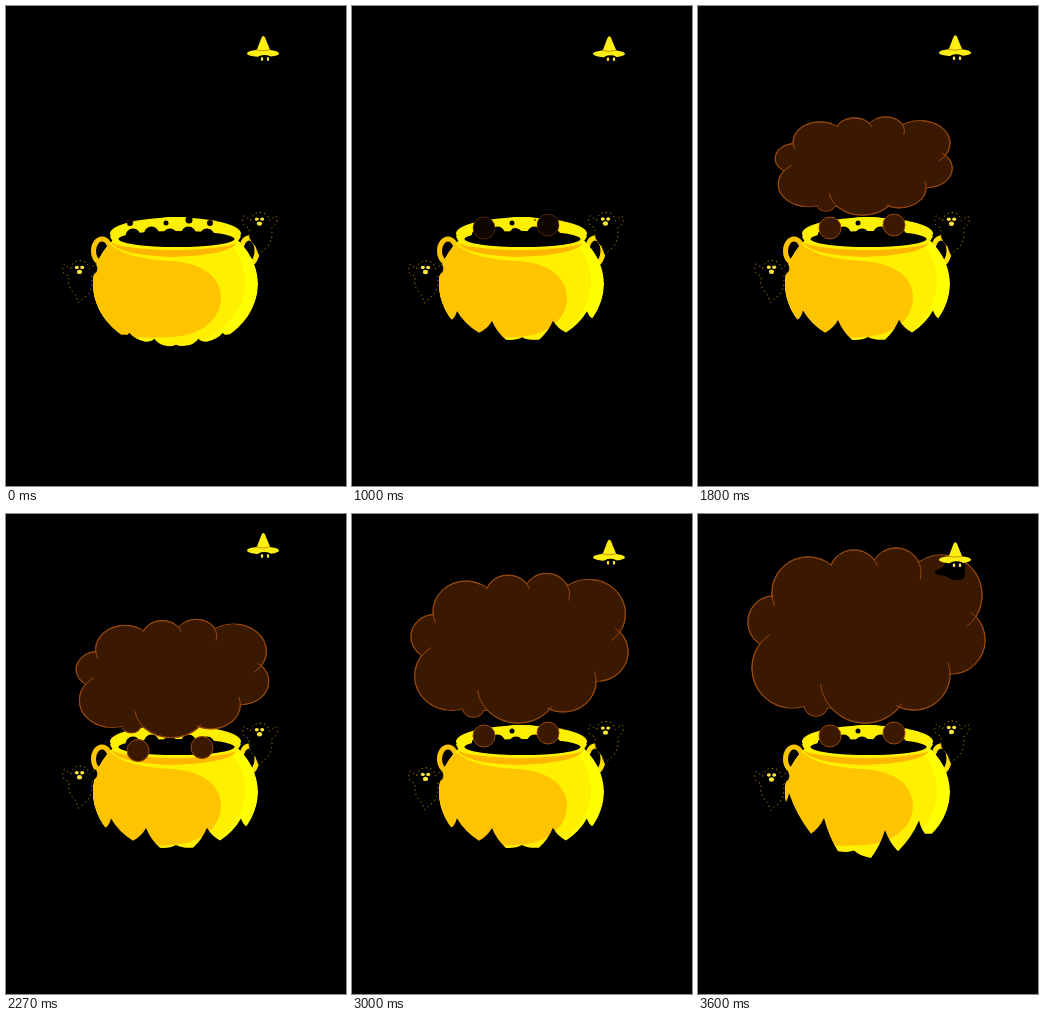
An HTML page with a canvas that plays this animation: 340x480 px, repeating every 3.67 s.

```html
<!DOCTYPE html>
<html lang="en">
<head>
<meta charset="utf-8">
<title>Cauldron</title>
<style>
html, body { margin: 0; width: 100%; height: 100%; overflow: hidden; background: #000; }
canvas { display: block; }
</style>
</head>
<body>
<canvas id="stage" width="340" height="480"></canvas>
<script>
const ctx = document.getElementById('stage').getContext('2d');
const LOOP = 3670, STEP = LOOP / 55, TAU = Math.PI * 2;
const YELLOW = '#fff000', AMBER = '#ffc400', PALE = '#ffe83a';
const SMOKE = '#3b1900', SMOKE_LINE = '#95480c';

// Cloud lobes (x, y, radius) inside a 237 x 175 box
const CLOUD = { width: 237, height: 175 };
const puffs = [[68, 156, 12], [165, 146, 15]];
const lobes = [[26, 74, 26], [60, 45, 36], [106, 27, 25], [148, 25, 25], [194, 47, 40],
  [203, 92, 34], [166, 126, 36], [117, 130, 45], [44, 120, 40]];
const cores = [[118, 80, 66], [85, 105, 55]];

const ramp = (t, from, to) => Math.min(1, Math.max(0, (t - from) / (to - from)));

function fill(color, shape) {
  ctx.fillStyle = color;
  ctx.fill(typeof shape === 'string' ? new Path2D(shape) : shape);
}
function line(color, width, shape) {
  ctx.strokeStyle = color;
  ctx.lineWidth = width;
  ctx.stroke(typeof shape === 'string' ? new Path2D(shape) : shape);
}
function oval(x, y, rx, ry = rx, from = 0, to = TAU) {
  const path = new Path2D();
  path.ellipse(x, y, rx, ry, 0, from, to);
  return path;
}

function drawPot() {
  line(AMBER, 5, oval(96, 245, 8.5, 12));
  line('#ffe000', 5, oval(243, 245, 8, 13));
  ctx.save();
  const body = oval(169.5, 278, 82.5, 67);
  ctx.clip(body);
  fill('#ff0', body);
  fill(YELLOW, oval(155, 276, 84, 68));
  fill(AMBER, 'M80 234L104 238C118 251 145 254 165 255C198 257 215 272 215 292C214 318 190 330 165 331C140 333 100 330 80 326Z');
  ctx.restore();

  fill(YELLOW, 'M104 230Q108 247 169 250Q230 247 235 230Z');
  fill('#ffb600', 'M105 236Q115 243 169 244Q218 243 231 237Q223 249 165 251Q112 249 105 236Z');
  fill(YELLOW, oval(169.5, 227.5, 65.5, 16));
  fill('#000', oval(170.5, 233, 58, 8));
  for (let i = 0; i < 5; i++) fill('#000', oval(127 + 18.5 * i, 230 - i % 2 * 2, 7.5));
}

// Valleys lie on an arc; between them rise five tongues that grow, then lean left.
function drawFlames(t) {
  const grow = .3 + .7 * ramp(t, 0, 1100), lean = ramp(t, 3000, 3600);
  const span = .72 + .28 * ramp(t, 0, 600);
  const floor = 340 - 5 * ramp(t, 0, 600) + 9 * lean;
  const arc = dx => floor - .0044 * (1 + .7 * lean) * dx * dx;
  const points = [-70, -65, -43, -30, -16, 0, 17, 31, 44, 65, 71].map((dx, i) => {
    const x = dx * span - 14 * lean;
    const height = i % 2 ? (i === 5 ? 4 : i % 4 === 3 ? 17 : 12) * grow * (1 + .5 * lean) : 0;
    return { x: 170 + x, y: arc(x) - height };
  });
  const first = points[0], last = points[points.length - 1];
  const path = new Path2D();
  path.moveTo(60, 400);
  path.lineTo(60, first.y);
  path.lineTo(first.x, first.y);
  points.slice(1).forEach((b, i) => {
    const a = points[i], toTip = i % 2 ? .35 : .65;
    path.quadraticCurveTo(a.x + (b.x - a.x) * toTip, (a.y + b.y) / 2 + 2, b.x, b.y);
  });
  path.lineTo(280, last.y);
  path.lineTo(280, 400);
  fill('#000', path);
}

function drawGhost(x, y) {
  ctx.save();
  ctx.translate(x, y);
  const body = 'M0 -8C6 -9 9 -4 10 0L16 -5Q19 -2 17 3L12 8Q14 18 8 26L-1 34L-4 26Q-13 18 -10 8L-16 4Q-18 -1 -15 -5L-9 0Q-7 -8 0 -8Z';
  fill('#000', body);
  ctx.setLineDash([1.5, 3]);
  line('#a07c00', 1, body);
  for (const side of [-1, 1]) fill(PALE, oval(2.7 * side, -1.5, 2, 1.7));
  fill(PALE, oval(0, 3, 2.6, 2.2));
  ctx.restore();
}

function drawWitch(y) {
  ctx.save();
  ctx.translate(257, y);
  fill('#000', 'M-9 17Q-9 26 -21 29Q-18 34 -11 33Q0 41 9 36Q12 27 8 17Z');
  fill('#ffee12', oval(0, 17.5, 16, 3.8));
  fill('#ffee12', 'M0 0Q2 0 3 4L8 16H-7L-2 3Q-1 0 0 0Z');
  line('#c89800', 1, 'M-7 14Q0 16 7 14');
  fill('#000', oval(1.5, 23.5, 8, 4.5));
  for (const x of [-1, 5]) fill(PALE, oval(x, 23, 1.2, 2));
  ctx.restore();
}

function drawCloud(t, drop) {
  const p = ramp(t, 700, 3600);
  const left = 94 - 44 * p, right = 234 + 53 * p, top = 158 - 124 * p, bottom = 209;
  const sx = (right - left) / CLOUD.width, sy = (bottom - top) / CLOUD.height;
  const lobe = ([x, y, r], inset = 0, from, to) =>
    oval(left + x * sx, top + drop + y * sy, r * sx - inset, r * sy - inset, from, to);
  const all = [...puffs, ...lobes, ...cores];
  ctx.globalAlpha = ramp(t, 1050, 1300);
  all.forEach(l => line(SMOKE_LINE, 1.4, lobe(l)));
  all.forEach(l => fill(SMOKE, lobe(l, .2)));
  // The outward arc of each lobe runs on a little into its neighbour.
  lobes.forEach(l => {
    const out = Math.atan2(l[1] - CLOUD.height / 2, l[0] - CLOUD.width / 2);
    line(SMOKE_LINE, 1, lobe(l, 0, out - 1, out + 1.4));
  });
  ctx.globalAlpha = 1;
}

function drawBubble(side, t, drop) {
  const grow = ramp(t, 0, 600), settle = ramp(t, 600, 1000), tint = ramp(t, 900, 1300);
  const x = 164 + 3.5 * (grow - settle) + side * (40 - 8 * settle);
  const y = 217 - 5.5 * grow + (9 - 1.5 * side) * settle + drop;
  const circle = oval(x, y, 3 + 6.5 * grow + 1.5 * settle);
  fill('#000', circle);
  ctx.globalAlpha = tint;
  fill(SMOKE, circle);
  ctx.globalAlpha = .3 + .7 * tint;
  line(SMOKE_LINE, 1, circle);
  ctx.globalAlpha = 1;
}

function drawDots(t, drop) {
  const swell = Math.sin(Math.PI * ramp(t, 0, 1200));
  fill('#000', oval(160, 217 + drop, 2.5));
  fill('#000', oval(163, 230 - 8 * swell, 8 * swell));
  fill('#000', oval(140, 230 - 7 * swell, 4 * swell));
  fill('#000', oval(183, 214, 3.5 * ramp(t, 1100, 700)));
}

function draw(now) {
  const t = Math.floor((now % LOOP + 5) / STEP) % 55 * STEP;
  const bob = Math.cos(TAU * (4 * t / LOOP - .065));
  const drop = 14.5 * Math.sin(Math.PI * ramp(t, 2000, 2540));
  fill('#000', 'M0 0H340V480H0Z');
  drawPot();
  drawDots(t, drop);
  drawFlames(t);
  drawGhost(73.5, 261.5 + 1.5 * bob);
  drawGhost(253.5, 216 - 1.5 * bob);
  drawCloud(t, drop);
  for (const side of [-1, 1]) drawBubble(side, t, drop);
  drawWitch(24.2 + 6.2 * bob);
}

const start = performance.now();
function tick() {
  draw(performance.now() - start);
  requestAnimationFrame(tick);
}
tick();
</script>
</body>
</html>
```
